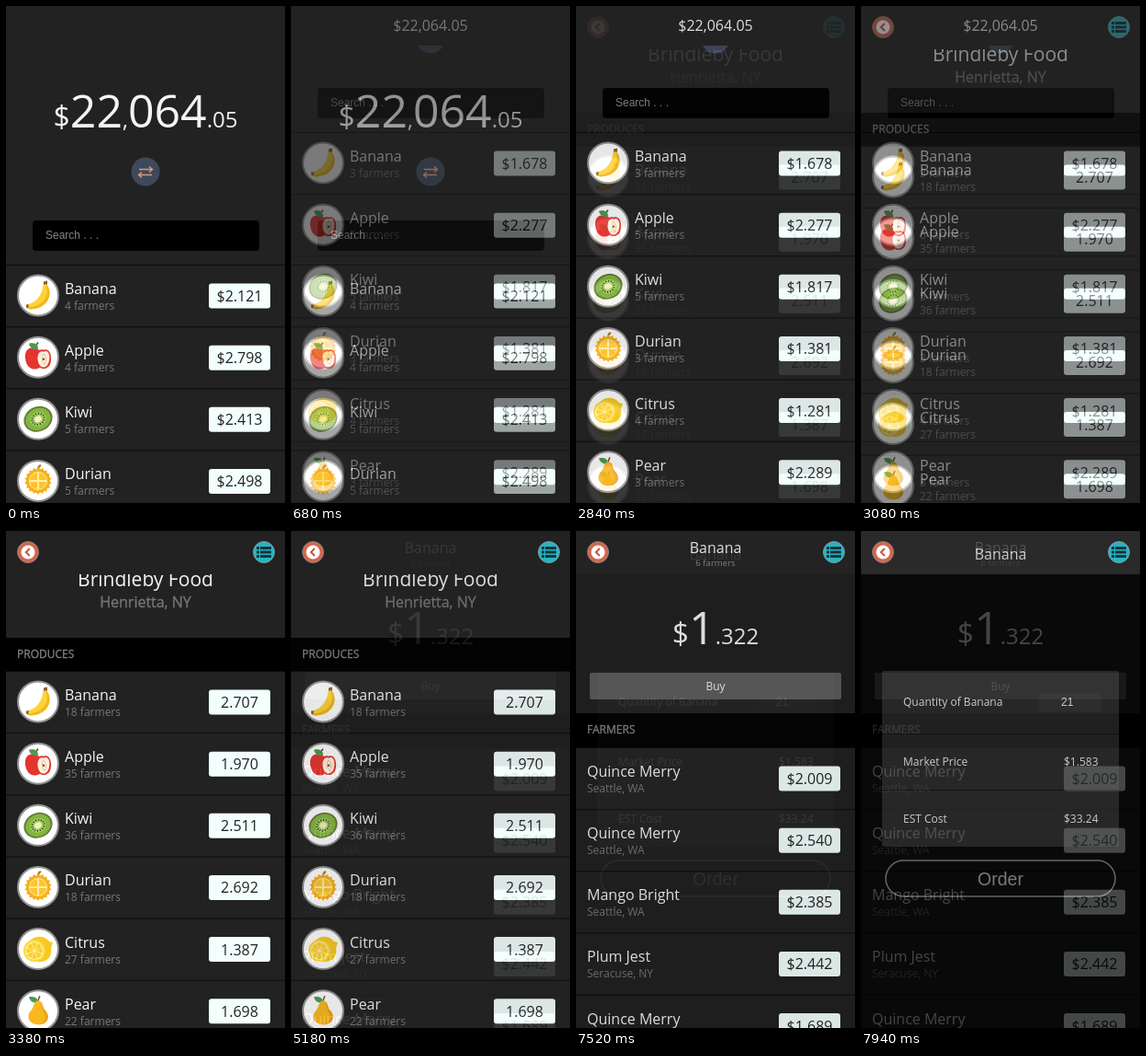
These frames come from a looping animation (304x540 px, 8 s). An HTML page:

```html
<!DOCTYPE html>
<html lang="en">
<head>
<meta charset="utf-8">
<title>Produce market</title>
<style>
  html, body { margin: 0; width: 100%; height: 100%; overflow: hidden; background: #222; }
  svg { display: block; width: 100vw; height: 100vh; }
  text { font-family: "Open Sans", "Noto Sans", sans-serif; white-space: pre; }
  .ui { font-family: "Liberation Sans", Arial, sans-serif; }
</style>
</head>
<body>
<svg id="stage" viewBox="0 0 304 540"></svg>
<script>
const WHITE = '#f4f4f4', GREY = '#777', PAGE = '#222';
const LOOP = 8000, STEP = 60, STEPS = 10;
const FADES = [500, 2840, 5180, 7520];

const text = (x, y, size, str, fill = WHITE, extra = '') =>
  `<text x="${x}" y="${y}" font-size="${size}" fill="${fill}" ${extra}>${str}</text>`;
const centred = (y, size, str, fill, extra = '') =>
  text(152, y, size, str, fill, `text-anchor="middle" ${extra}`);
const rect = (x, y, w, h, fill, r = 0, extra = '') =>
  `<rect x="${x}" y="${y}" width="${w}" height="${h}" rx="${r}" fill="${fill}" ${extra}/>`;
const circle = (x, y, r, fill, extra = '') =>
  `<circle cx="${x}" cy="${y}" r="${r}" fill="${fill}" ${extra}/>`;
const path = (d, fill, extra = '') => `<path d="${d}" fill="${fill}" ${extra}/>`;
const line = (d, stroke, width) => path(d, 'none', `stroke="${stroke}" stroke-width="${width}"`);
const at = (x, y, content) => `<g transform="translate(${x} ${y})">${content}</g>`;
const page = rect(0, 0, 304, 540, PAGE);

// Evenly spaced copies around a centre
const spin = (n, shape) => Array.from({ length: n }, (_, i) =>
  `<g transform="rotate(${i * 360 / n})">${shape}</g>`).join('');

const leaf = path('M0,-9C0,-15 -5,-16 -10,-15C-9,-10 -5,-8 0,-9Z', '#4a9b4f');
const fruits = {
  Banana:
    path('M6,-15L10,-16L10,-11C17,0 9,15 -9,15L-13,13L-13,10C-1,8 5,-1 6,-15Z', '#fdd337') +
    path('M9,-10C13,2 3,13 -12,13L-9,15C9,15 17,0 10,-11Z', '#f3b51f') +
    path('M6,-15L10,-16L10,-12L6,-12ZM-13,10L-10,10L-11,14L-13,13Z', '#806040'),
  Apple:
    path('M-3,-9C-10,-13 -15,-7 -14,1C-13,10 -7,15 0,12C8,10 9,-9 -3,-9Z', '#e5352f') +
    line('M-3,-9Q-3,-13 0,-16', '#74472e', 1.5) + leaf +
    path('M6,-8C-2,-11 -5,2 1,10C4,14 10,13 13,8C16,0 13,-11 6,-8Z', '#e5352f') +
    path('M6,-6C0,-9 -3,2 2,9C5,12 9,11 11,7C14,0 12,-9 6,-6Z', '#fff1dd') +
    line('M6,-4Q2,2 7,8Q11,2 6,-4', '#dfb48d', .8) + circle(6, 2, 1.2, '#70412a'),
  Kiwi: `<g transform="rotate(-25) scale(1 .84)">` +
    circle(0, 0, 16, '#68783b') + circle(0, 0, 14, '#82b63f') + circle(0, 0, 9, '#a5cf60') +
    spin(14, rect(-.6, -8, 1.3, 2.3, '#293b20', .6)) + circle(0, 0, 4, '#eef1bb') + '</g>',
  Durian:
    line('M0,-12Q0,-16 3,-17', '#a67a24', 2) + spin(18, path('M-2,-12L0,-15L2,-12Z', '#f5aa18')) +
    circle(0, 0, 13, '#f5b020') + circle(0, 0, 10, '#fff0a0') +
    spin(4, path('M1,-1V-9Q8,-8 9,-1Z', '#ffc42f')),
  Citrus:
    path('M-9,-9C-2,-16 8,-14 12,-8L16,-7L14,-1C16,9 9,15 0,14C-9,12 -12,1 -9,-9Z', '#f7c91f') +
    circle(-4, 2, 12, '#fbd83b') + circle(-4, 2, 10, '#fff3b2') +
    at(-4, 2, spin(8, path('M0,-1L-3,-8Q0,-10 3,-8Z', '#fbd02c'))),
  Pear:
    line('M0,-9Q0,-13 2,-16', '#79502b', 1.5) + leaf +
    path('M0,-11C-5,-11 -4,-4 -8,0C-14,7 -9,15 0,15C10,15 14,7 8,0C4,-4 5,-11 0,-11Z', '#f9b820') +
    path('M3,-10C4,-3 5,0 7,4C9,10 5,14 0,15C10,15 14,7 8,0C4,-4 5,-9 3,-10Z', '#eda31c'),
};

function row(top, name, detail, price, fruit) {
  const x = fruit ? 64 : 12;
  const badge = fruit ? circle(0, 0, 22, '#fff', 'stroke="#929292" stroke-width="2"') + fruit : '';
  return at(0, top,
    rect(0, 0, 304, 1, '#0b0b0b') + at(35, 33.5, badge) +
    text(x, 32, 16, name) + text(x, 49, 12, detail, GREY) +
    rect(221, 20.5, 67, 27, '#f2fffd', 3) +
    text(254.5, 40, 16, price, '#222', 'text-anchor="middle"'));
}

const rows = (top, list) => list.map((args, i) => row(top + i * 67.15, ...args)).join('');

function produce(top, counts, prices, sign = '') {
  const names = Object.keys(fruits);
  return rows(top, prices.map((price, i) =>
    [names[i], counts[i] + ' farmers', sign + price, fruits[names[i]]]));
}

const swapButton = y => at(152, y,
  circle(0, 0, 15.5, '#3f495b') +
  line('M-7,-2.5H7M4,-5.5L7.5,-2.5L4,.5M7,3.5H-7M-4,.5L-7.5,3.5L-4,6.5', '#d99a76', 1.4));

const search = y => rect(29, y, 247, 33, '#000', 4) +
  text(43, y + 20, 12, 'Search . . .', '#858585', 'class="ui"');

const bigPrice = (y, parts) => centred(y, 50, parts.map(([str, size]) =>
  `<tspan font-size="${size}">${str}</tspan>`).join(''));

const section = (y, h, label) => rect(0, y, 304, h, '#000') +
  text(12, y + 22, 12, label, '#858585', 'stroke="#858585" stroke-width=".3"');

const navButtons =
  at(24, 23, circle(0, 0, 11.5, '#d2674f', 'stroke="#8b8079"') + circle(0, 0, 7.5, '#fff') +
    line('M1.8,-4L-2.2,0L1.8,4', '#c8553d', 2)) +
  at(281, 23, circle(0, 0, 11.5, '#25b5c4', 'stroke="#84999b"') +
    [-4.5, 0, 4.5].map(y => rect(-8, y - 1.5, 3, 3, '#16343c') + rect(-4, y - 1.5, 12, 3, '#16343c')).join(''));

const home = page +
  bigPrice(132, [['$', 32], ['22', 50], [',', 24], ['064', 50], ['.05', 24]]) +
  swapButton(180) + search(233) +
  produce(281, [4, 4, 5, 5], ['2.121', '2.798', '2.413', '2.498'], '$');

const scrolled = page + swapButton(36) + rect(0, 0, 304, 43, PAGE) +
  centred(27, 16, '$22,064.05') + search(89) +
  produce(137, [3, 5, 5, 3, 4, 3], ['1.678', '2.277', '1.817', '1.381', '1.281', '2.289'], '$');

const market = page + centred(60, 21, 'Brindleby Food') + rect(0, 0, 304, 47, PAGE) +
  centred(83, 16, 'Henrietta, NY', GREY, `stroke="${GREY}" stroke-width=".3"`) + navButtons +
  section(116, 36, 'PRODUCES') +
  produce(152, [18, 35, 36, 18, 27, 22], ['2.707', '1.970', '2.511', '2.692', '1.387', '1.698']);

const detail = page + navButtons + centred(24, 16, 'Banana') + centred(38, 9.6, '6 farmers', '#8a8a8a') +
  bigPrice(123, [['$', 32], ['1', 50], ['.322', 24]]) +
  rect(15, 154, 274, 29, '#5c5c5c', 2) + centred(173, 12, 'Buy') +
  section(198, 37, 'FARMERS') +
  rows(235, [
    ['Quince Merry', 'Seattle, WA', '$2.009'],
    ['Quince Merry', 'Seattle, WA', '$2.540'],
    ['Mango Bright', 'Seattle, WA', '$2.385'],
    ['Plum Jest', 'Seracuse, NY', '$2.442'],
    ['Quince Merry', 'Seattle, WA', '$1.689'],
  ]);

const order = rect(0, 0, 304, 540, '#000', 0, 'opacity=".9"') +
  rect(0, 0, 304, 47, '#2c2c2c') + navButtons + centred(31, 16, 'Banana') +
  rect(23, 152, 258, 191, '#292929', 2) + rect(193, 176, 69, 20, '#303030') +
  rect(23, 220, 258, 1, '#141414') + rect(23, 281, 258, 1, '#141414') +
  text(46, 190, 12, 'Quantity of Banana') + text(218, 190, 12, '21', WHITE, 'class="ui"') +
  text(46, 255, 12, 'Market Price') + text(221, 255, 12, '$1.583') +
  text(46, 317, 12, 'EST Cost') + text(221, 317, 12, '$33.24') +
  rect(27, 358, 250, 39, 'none', 19.5, 'stroke="#777" stroke-width="1.5"') +
  centred(385, 19.5, 'Order', '#8e8e8e', 'class="ui"');

const stage = document.getElementById('stage');
stage.innerHTML = home + [scrolled, market, detail, order]
  .map(screen => `<g class="screen" opacity="0">${screen}</g>`).join('');
const screens = stage.querySelectorAll('.screen');

// Each screen fades in over the previous one in ten equal steps
function draw() {
  const t = performance.now() % LOOP;
  screens.forEach((screen, i) => {
    const step = Math.floor((t - FADES[i]) / STEP) + 1;
    screen.setAttribute('opacity', Math.max(0, Math.min(STEPS, step)) / STEPS);
  });
  requestAnimationFrame(draw);
}
draw();
</script>
</body>
</html>
```
